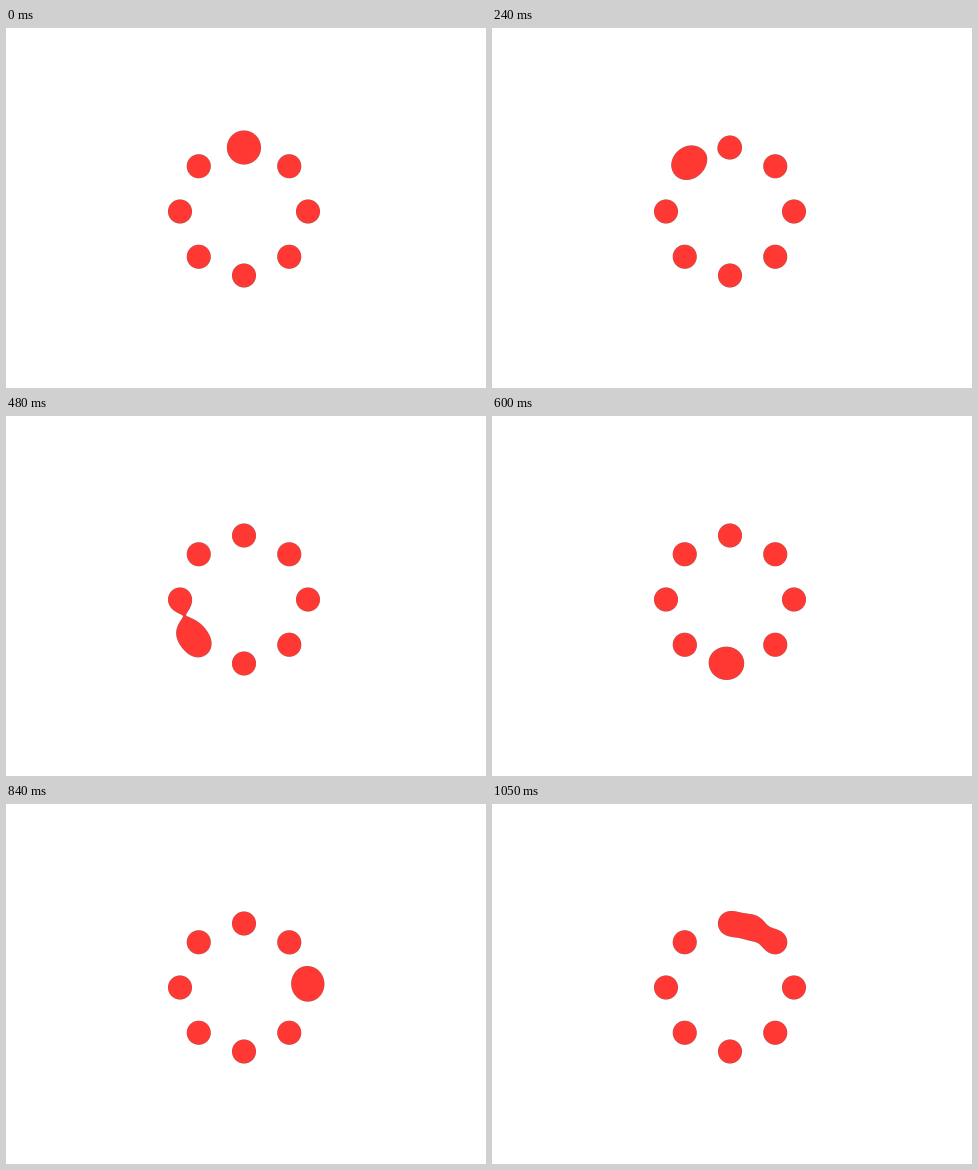
Recreate the animation shown at these times as an HTML page with a canvas. Size 480 by 360 pixels, loop 1.08 s.

```html
<!DOCTYPE html>
<html lang="en">
<head>
<meta charset="utf-8">
<title>Loader</title>
<style>
  html, body { margin: 0; width: 100%; height: 100%; overflow: hidden; background: #fff; }
  canvas { display: block; }
</style>
</head>
<body>
<canvas id="stage" width="480" height="360"></canvas>
<script>
const ctx = document.getElementById('stage').getContext('2d');
const LOOP = 1080, STEP = 30;
const CX = 238, CY = 183.5, RING = 64, DOT = 12;
const SPREAD = 209;                       // falloff of each dot's field
const RED = [255, 56, 51], RIM = [90, 60, 60];
const BOX = { x: 150, y: 95, w: 176, h: 176 };
const img = ctx.createImageData(BOX.w, BOX.h);

const clamp = v => Math.max(0, Math.min(1, v));

// Angle in degrees, counterclockwise from the top
function onRing(deg) {
  const a = deg * Math.PI / 180;
  return { x: CX - RING * Math.sin(a), y: CY - RING * Math.cos(a) };
}

const dots = Array.from({ length: 8 }, (_, i) => onRing(i * 45));

// Sine ease; the loop restarts before the turn is complete
function runnerAngle(t) {
  const phase = (2 + 4.3 * t / STEP) * Math.PI / 180;
  return 180 * (1 - Math.cos(phase));
}

// Approximate distance inside the merged outline, negative outside
function depth(x, y, balls) {
  let f = 0, gx = 0, gy = 0;
  for (const b of balls) {
    const dx = x - b.x, dy = y - b.y, d2 = dx * dx + dy * dy;
    if (d2 > 2500) continue;
    const g = Math.exp((DOT * DOT - d2) / SPREAD);
    f += g;
    gx += g * dx;
    gy += g * dy;
  }
  if (f < 0.3) return -9;
  if (f > 1.6) return 9;
  const slope = 2 * Math.hypot(gx, gy) / SPREAD;
  return (f - 1) / Math.max(slope, 0.02);
}

function draw(t) {
  const balls = [...dots, onRing(runnerAngle(t))];
  const px = img.data;
  let i = 0;
  for (let y = 0; y < BOX.h; y++) {
    for (let x = 0; x < BOX.w; x++) {
      const d = depth(BOX.x + x + 0.5, BOX.y + y + 0.5, balls);
      const cover = clamp(d + 0.5);
      const rim = clamp(0.6 - d);
      for (let c = 0; c < 3; c++) {
        const ink = RED[c] + (RIM[c] - RED[c]) * rim;
        px[i++] = 255 + (ink - 255) * cover;
      }
      px[i++] = 255;
    }
  }
  ctx.putImageData(img, BOX.x, BOX.y);
}

let last = -1;
function tick() {
  const t = Math.floor(performance.now() % LOOP / STEP) * STEP;
  if (t !== last) draw(last = t);
  requestAnimationFrame(tick);
}

ctx.fillStyle = '#fff';
ctx.fillRect(0, 0, 480, 360);
tick();
</script>
</body>
</html>
```
